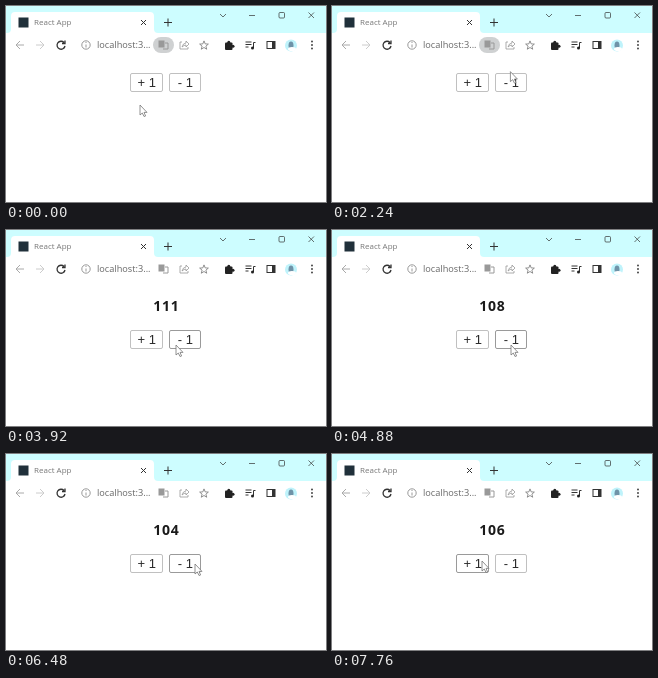
Recreate the animation shown at these times as an HTML page. Size 320 px wide and 196 px high, loop 8 s.

```html
<!DOCTYPE html>
<html lang="en">
<head>
<meta charset="utf-8">
<title>Counter</title>
<style>
html, body { margin: 0; height: 100%; overflow: hidden; background: #fff; }
svg { display: block; width: 100vw; height: 100vh; }
.line { fill: none; stroke: #333; }
.soft { stroke: #999; }
.tab, .url { font: 8px "Open Sans", "Noto Sans", sans-serif; fill: #777; }
.url { font-size: 9.2px; fill: #666; }
.num { font: bold 14px "Open Sans", "Noto Sans", sans-serif; letter-spacing: .8px; fill: #1a1a1a; text-anchor: middle; }
.btn text { font: 13px "Liberation Sans", Arial, sans-serif; fill: #2a2a2a; text-anchor: middle; }
.btn rect { fill: #fff; stroke: #c0c0c0; }
.btn.hover rect { stroke: #9a9a9a; }
.btn.down rect { fill: #f6f6f6; }
</style>
</head>
<body>
<svg viewBox="0 0 320 196">
  <rect width="320" height="27" fill="#cdfdff"/>
  <path d="M1 27Q5 27 5 23V10Q5 6 9 6H144Q148 6 148 10V23Q148 27 152 27Z" fill="#fff"/>
  <rect x="12.5" y="11.5" width="10" height="10" fill="#20303a"/>
  <text class="tab" x="28" y="19">React App</text>

  <!-- tab and window controls -->
  <path class="line" d="M135 14l5 5m0-5l-5 5M158 16.5h8m-4-4v8"/>
  <g class="line" stroke-width=".7">
    <path d="M214 8l3 3 3-3M243 9.500h6M302.500 6.500l5.500 5.500m0-5.500l-5.500 5.500"/>
    <rect x="273" y="6.500" width="5.500" height="5.500" rx="1"/>
  </g>

  <!-- toolbar -->
  <rect id="pill" x="147" y="31" width="21" height="16" rx="8" fill="#cfd1d2"/>
  <g class="line">
    <path d="M18 39h-8m4-4l-4 4 4 4" stroke="#aaa"/>
    <path d="M30 39h8m-4-4l4 4-4 4" stroke="#ccc"/>
    <path d="M58 36.500A4 4 0 1 0 59 40M59 34.500v3h-3" stroke-width="1.300"/>
    <path class="soft" d="M80 38.500v3M80 36v1"/>
    <circle class="soft" cx="80" cy="39" r="4.200"/>
    <rect class="soft" x="153" y="35" width="5" height="6" fill="#999"/>
    <path class="soft" d="M159 37h3v6h-5"/>
    <path class="soft" d="M176 36h-2v7h8v-2M176 41q1-4 4-4v-2l3 3-3 3v-2q-2 0-4 2z" stroke-width=".8"/>
    <path id="star" stroke="#777" stroke-width=".8"/>
    <path d="M239.500 36h6m-6 2.500h6m-6 2.500h3M247.500 42v-5.500h2"/>
    <rect x="261" y="35.500" width="8" height="7"/>
    <path d="M267.500 35.500v7" stroke-width="3"/>
    <path d="M306 35.500v8" stroke-width="1.800" stroke-linecap="round" stroke-dasharray="0 3.500"/>
  </g>
  <g fill="#222">
    <rect x="219" y="36.500" width="7.500" height="7.500" rx="1"/>
    <circle cx="222.800" cy="36.300" r="1.500"/>
    <circle cx="227" cy="40.200" r="1.500"/>
    <circle cx="246.500" cy="42" r="1.500"/>
  </g>
  <text class="url" x="91" y="42.300">localhost:3...</text>
  <circle cx="285" cy="39.500" r="6" fill="#bff3fb"/>
  <ellipse cx="285" cy="39.500" rx="2.500" ry="4" fill="#6f93a8"/>
  <ellipse cx="286" cy="43" rx="4" ry="2" fill="#fff"/>

  <!-- page -->
  <text class="num" id="num" x="160.400" y="80.500"></text>
  <g id="row">
    <g class="btn" id="plus"><rect x="124.500" y="67.500" width="32" height="18" rx="1.500"/><text x="140.700" y="81">+ 1</text></g>
    <g class="btn" id="minus"><rect x="163.500" y="67.500" width="31" height="18" rx="1.500"/><text x="179.300" y="81">- 1</text></g>
  </g>
  <path id="cursor" d="M0 0V10L2.300 8 4 11.500 5.600 11 4 7.400H7Z" fill="#fff" stroke="#777" stroke-width=".8"/>
</svg>
<script>
const LOOP = 8000, STEP = 80;
const $ = id => document.getElementById(id);

// one slot per beat: which button is clicked, if any
const BEAT = 240, FIRST = 2560, CLICKS = "+.++...---.--.--....++";

// stops of the pointer: time, x, y
const STOPS = [
  [0, 134, 99], [480, 190, 62], [960, 193, 63], [2080, 196, 60], [2480, 146, 76],
  [2880, 150, 90], [3040, 150, 106], [3440, 150, 106], [3920, 170, 115], [4640, 172, 115],
  [4880, 179, 115], [5360, 188, 111], [6480, 189, 110], [7280, 150, 107], [LOOP, 150, 107]
];

function pointer(t) {
  const i = STOPS.findIndex(s => s[0] > t);
  const [t0, x0, y0] = STOPS[i - 1], [t1, x1, y1] = STOPS[i];
  const k = (t - t0) / (t1 - t0), ease = k * k * (3 - 2 * k);
  return [x0 + (x1 - x0) * ease, y0 + (y1 - y0) * ease];
}

// "+" joins text until the first "-" turns the value into a number
function count(t) {
  const beats = Math.max(0, Math.floor((t - FIRST - STEP) / BEAT) + 1);
  let value = "";
  for (const sign of CLICKS.slice(0, beats)) {
    if (sign === "+") value += value === "" ? "1" : 1;
    if (sign === "-") value -= 1;
  }
  return value;
}

function draw(now) {
  const t = Math.floor(now % LOOP / STEP) * STEP;
  const [x, y] = pointer(t), value = count(t);
  const shift = value === "" ? 0 : 33;
  const pressed = CLICKS[(t - FIRST) / BEAT];
  $("num").textContent = value;
  $("row").setAttribute("transform", `translate(0 ${shift})`);
  $("cursor").setAttribute("transform", `translate(${x} ${y})`);
  $("pill").setAttribute("visibility", shift ? "hidden" : "visible");
  for (const [id, sign, left] of [["plus", "+", 124], ["minus", "-", 163]]) {
    const over = x >= left && x < left + 32 && y >= 67 + shift && y < 86 + shift;
    $(id).classList.toggle("hover", over);
    $(id).classList.toggle("down", pressed === sign);
  }
}

const tips = Array.from({ length: 10 }, (_, i) => {
  const r = i % 2 ? 2 : 4.6, a = i * Math.PI / 5;
  return [198 + r * Math.sin(a), 39.5 - r * Math.cos(a)];
});
$("star").setAttribute("d", `M${tips.join("L")}Z`);

const start = performance.now();
function tick() {
  draw(performance.now() - start);
  requestAnimationFrame(tick);
}
tick();
</script>
</body>
</html>
```
